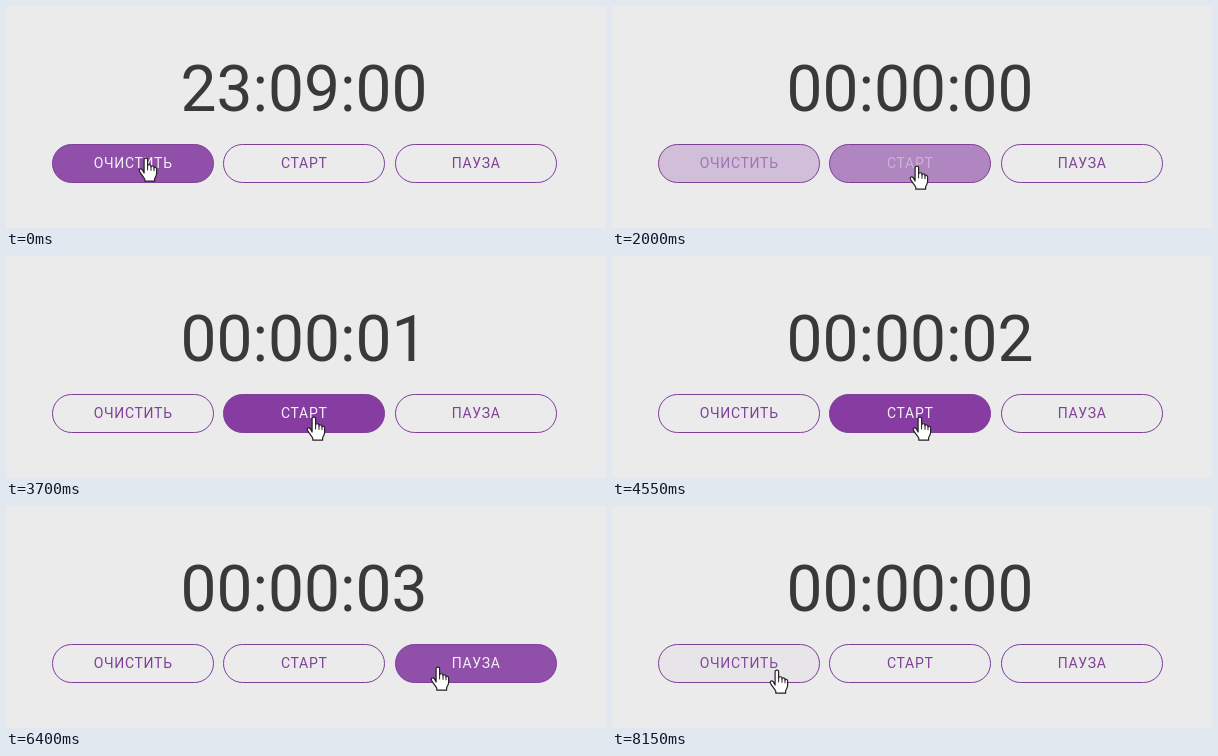
Write an HTML page that moves like this. It is 600 px wide and 222 px high and loops after 8.2 s.

```html
<!DOCTYPE html>
<html lang="ru">
<head>
<meta charset="utf-8">
<style>
  html, body { margin: 0; width: 100%; height: 100%; overflow: hidden; background: #ebebeb; }
  svg { display: block; width: 600px; height: 222px; }
  text { font-family: Roboto, sans-serif; text-anchor: middle; }
  #clock { font-size: 64px; fill: #39393a; }
  .label { font-size: 14px; letter-spacing: .7px; }
  .pill { stroke: #7d3f98; stroke-width: 1; }
</style>
</head>
<body>
<svg viewBox="0 0 600 222">
  <text id="clock" x="298" y="104.5"></text>
  <g id="buttons"></g>
  <g id="hand" stroke-linejoin="round" stroke-linecap="round">
    <path fill="#fff" stroke="#222" stroke-width="1.2" d="M-1.9 15V1.6C-1.9-.5 1.6-.5 1.6 1.6V8
      C1.6 6.2 5 6.4 5 8.3V9C5 7.3 8 7.6 8 9.4V10C8 8.6 10.6 9 10.6 10.9V15.6
      C10.6 18 9 19.2 8.6 21V23.2H-1.2V21.2C-2.6 18.6-5.2 16-6.5 13.2
      C-7.5 10.8-5 10-3.6 11.9Z"/>
    <path fill="none" stroke="#222" d="M1.6 8V12M5 9V12.4M8 10V12.8"/>
  </g>
</svg>
<script>
const LOOP = 8200, FADE = 250;
const PAGE = [235, 235, 235], PURPLE = [128, 64, 152], HOVER = [144, 79, 169],
      PRESSED = [134, 60, 160], LIGHT = [245, 240, 247];

// Each hover is [enter, leave] in ms
const buttons = [
  { text: 'ОЧИСТИТЬ', x: 46.5, hovers: [[-FADE, 1840], [7259, 7930]] },
  { text: 'СТАРТ', x: 217.5, hovers: [[1851, 5042], [7072, 7246]] },
  { text: 'ПАУЗА', x: 389.5, hovers: [[5061, 7057]] },
];

// Pointer stops: [time, x, y]
const path = [
  [0, 140, 152], [1731, 140, 152], [1981, 305, 160], [2900, 305, 160],
  [3200, 308, 161], [4850, 308, 161], [5200, 432, 161], [6950, 432, 161],
  [7385, 150, 161], [7800, 150, 161], [8100, 165, 164], [LOOP, 165, 164],
];

const readings = [
  [0, '23:09:00'], [900, '00:00:00'], [3200, '00:00:01'],
  [4200, '00:00:02'], [5200, '00:00:03'], [7700, '00:00:00'],
];

const lerp = (a, b, u) => a + (b - a) * u;
const smooth = (a, b, t) => {
  const u = Math.min(1, Math.max(0, (t - a) / (b - a)));
  return u * u * (3 - 2 * u);
};
const mix = (a, b, u) => `rgb(${a.map((v, i) => Math.round(lerp(v, b[i], u)))})`;
const fadeIn = (t, start) => smooth(start, start + FADE, t);

function add(parent, tag, attributes) {
  const node = document.createElementNS('http://www.w3.org/2000/svg', tag);
  for (const name in attributes) node.setAttribute(name, attributes[name]);
  return parent.appendChild(node);
}

const clock = document.getElementById('clock');
const hand = document.getElementById('hand');
const group = document.getElementById('buttons');

for (const button of buttons) {
  button.pill = add(group, 'rect', { class: 'pill', x: button.x, y: 138.5, width: 161, height: 38, rx: 19 });
  button.label = add(group, 'text', { class: 'label', x: button.x + 80.7, y: 162 });
  button.label.textContent = button.text;
}

function draw(t) {
  clock.textContent = readings.findLast(([start]) => start <= t)[1];

  buttons.forEach((button, i) => {
    const level = Math.max(...button.hovers.map(([enter, leave]) =>
      fadeIn(t, enter) * (1 - fadeIn(t, leave))));
    const press = i === 1 ? smooth(2950, 3200, t) * (1 - fadeIn(t, 5042)) : 0;
    const fill = HOVER.map((v, c) => lerp(v, PRESSED[c], press));
    button.pill.style.fill = mix(PAGE, fill, level);
    button.label.style.fill = mix(PURPLE, LIGHT, level);
  });

  const next = path.findIndex(([time]) => time > t);
  const [start, x0, y0] = path[next - 1], [end, x1, y1] = path[next];
  const u = smooth(start, end, t);
  hand.setAttribute('transform', `translate(${lerp(x0, x1, u)} ${lerp(y0, y1, u)})`);
}

function tick() {
  draw(performance.now() % LOOP);
  requestAnimationFrame(tick);
}
tick();
</script>
</body>
</html>
```
